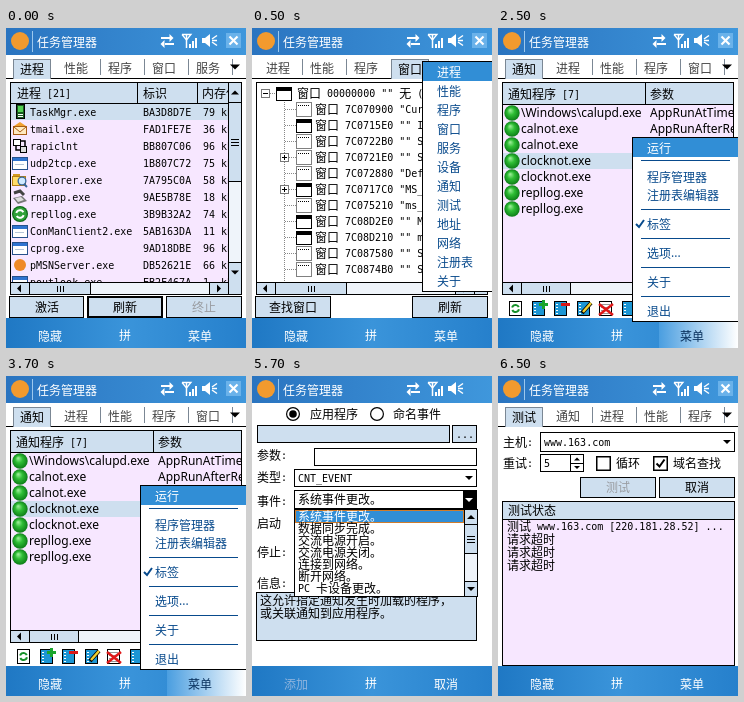
An HTML page with a canvas that plays this animation: 240x320 px, repeating every 8 s.

```html
<!DOCTYPE html>
<html lang="zh-CN">
<head>
<meta charset="utf-8">
<title>任务管理器</title>
<style>
html, body { margin: 0; width: 100%; height: 100%; overflow: hidden; background: #fff; }
canvas { display: block; width: 240px; height: 320px; }
</style>
</head>
<body>
<canvas id="stage" width="240" height="320"></canvas>
<script>
const ctx = document.getElementById('stage').getContext('2d');
const CJK = '"Noto Sans CJK SC", "Noto Sans CJK", sans-serif';
const MONO = '10px "DejaVu Sans Mono", monospace';
const SANS = '12px "Noto Sans", "Open Sans", sans-serif';
const FACE = '#cedfef', LILAC = '#f7e7ff', BLUE = '#318ed6', GRAY = '#9a9da2', NAVY = '#084a8c';

// ---------- primitives ----------
function fill(x, y, w, h, color) {
  ctx.fillStyle = color;
  ctx.fillRect(x, y, w, h);
}

function box(x, y, w, h, color, edge = '#000') {
  fill(x, y, w, h, edge);
  fill(x + 1, y + 1, w - 2, h - 2, color);
}

function line(points, color = '#000', width = 1) {
  ctx.strokeStyle = color;
  ctx.lineWidth = width;
  ctx.beginPath();
  points.forEach(([x, y], i) => i ? ctx.lineTo(x, y) : ctx.moveTo(x, y));
  ctx.stroke();
}

function poly(points, color = '#000') {
  ctx.fillStyle = color;
  ctx.beginPath();
  points.forEach(([x, y]) => ctx.lineTo(x, y));
  ctx.fill();
}

function disc(x, y, r, color) {
  ctx.fillStyle = color;
  ctx.beginPath();
  ctx.arc(x, y, r, 0, Math.PI * 2);
  ctx.fill();
}

function arc(x, y, r, from, to, color, width = 1) {
  ctx.strokeStyle = color;
  ctx.lineWidth = width;
  ctx.beginPath();
  ctx.arc(x, y, r, from, to);
  ctx.stroke();
}

function clip(x, y, w, h, draw) {
  ctx.save();
  ctx.beginPath();
  ctx.rect(x, y, w, h);
  ctx.clip();
  draw();
  ctx.restore();
}

// Wide glyphs fill a 12px cell, Latin ones a 6px cell; cy is the row centre.
function text(str, x, cy, color = '#000', latin = MONO) {
  ctx.fillStyle = color;
  for (const run of str.match(/[\u3000-\u9fff\uff00-\uffef]+|[^\u3000-\u9fff\uff00-\uffef]+/g)) {
    const wide = run.charCodeAt(0) >= 0x3000;
    ctx.font = wide ? '12px ' + CJK : latin;
    ctx.fillText(run, x, cy + (wide ? 5 : 4));
    x += ctx.measureText(run).width;
  }
}

function arrow(x, y, dir, s = 4, color = '#000') {
  ctx.save();
  ctx.translate(x, y);
  ctx.rotate({ down: 0, left: 1, up: 2, right: 3 }[dir] * Math.PI / 2);
  poly([[-s, -s / 2], [s, -s / 2], [0, s / 2]], color);
  ctx.restore();
}

function check(x, y, color = '#000') {
  line([[x - 4, y], [x - 1, y + 3], [x + 4, y - 4]], color, 2);
}

// ---------- widgets ----------
function vScroll(x, y, h, thumb, btn = 21) {
  box(x, y, 14, h, '#eff4fa');
  box(x, y, 14, btn, FACE);
  box(x, y + btn - 1, 14, thumb, FACE);
  box(x, y + h - btn, 14, btn, FACE);
  arrow(x + 7, y + btn / 2, 'up');
  arrow(x + 7, y + h - btn / 2, 'down');
  const mid = Math.round(y + btn - 1 + thumb / 2);
  for (let i = -1; i < 2; i++) fill(x + 3, mid + i * 3, 8, 1, '#000');
}

function hScroll(x, y, w, thumb, btn = 20) {
  box(x, y, w, 13, '#eff4fa');
  box(x, y, btn, 13, FACE);
  box(x + btn - 1, y, thumb, 13, FACE);
  box(x + w - btn, y, btn, 13, FACE);
  arrow(x + btn / 2 - 1, y + 6.5, 'left');
  arrow(x + w - btn / 2, y + 6.5, 'right');
  const mid = Math.round(x + btn - 1 + thumb / 2);
  for (let i = -1; i < 2; i++) fill(mid + i * 3, y + 4, 1, 6, '#000');
}

function button(label, x, y, w, h, off, strong) {
  box(x, y, w, h, FACE);
  if (strong) box(x + 1, y + 1, w - 2, h - 2, FACE);
  text(label, Math.round(x + (w - label.length * 12) / 2), y + Math.floor(h / 2), off ? GRAY : '#000');
}

function combo(value, x, y, w, h) {
  box(x, y, w, h, '#fff');
  text(value, x + 4, y + Math.floor(h / 2));
  arrow(x + w - 8, y + h / 2, 'down');
}

function radio(x, y, on) {
  disc(x, y, 7, '#000');
  disc(x, y, 5.8, '#fff');
  if (on) disc(x, y, 3.8, '#000');
}

function checkbox(x, y, on) {
  box(x, y, 15, 15, '#000');
  fill(x + 1.5, y + 1.5, 12, 12, '#fff');
  if (on) check(x + 7.5, y + 7.5);
}

function tabs(names, active) {
  fill(0, 50, 240, 1, '#000');
  names.forEach((name, i) => {
    const x = 7 + i * 44, on = i === active;
    if (on) {
      fill(x, 31, 38, 20, '#7b8794');
      fill(x + 1, 32, 36, 19, FACE);
    } else if (i + 1 !== active) {
      fill(x + 43, 31, 1, 16, '#7b8794');
    }
    text(name, x + 7, on ? 41 : 40, on ? '#000' : '#444');
  });
  arrow(229, 39, 'down', 5);
}

// ---------- chrome ----------
function bar(x, y, w, h, ...stops) {
  const g = ctx.createLinearGradient(x, 0, x + w, 0);
  stops.forEach((color, i) => g.addColorStop(i / (stops.length - 1), color));
  fill(x, y, w, h, g);
}

function statusIcons(close) {
  line([[155, 10], [164, 10]], '#fff', 2);
  line([[159, 16], [168, 16]], '#fff', 2);
  arrow(165.5, 10, 'right', 4, '#fff');
  arrow(156.5, 16, 'left', 4, '#fff');

  line([[176, 6.5], [185, 6.5], [180.5, 12], [176, 6.5]], '#fff', 1.3);
  line([[180.5, 7], [180.5, 20]], '#fff', 1.5);
  for (let i = 0; i < 3; i++) fill(183 + i * 3, 16 - i * 3, 2, 4 + i * 3, '#fff');

  poly([[196, 10], [199, 10], [204, 6], [204, 19], [199, 15], [196, 15]], '#fff');
  for (const d of [-5, 0, 5]) line([[206, 12.5 + d * 0.3], [211, 12.5 + d]], '#fff', 1.5);

  if (close) {
    fill(220, 5, 15, 15, '#6ab2ea');
    line([[223.5, 8.5], [231.5, 16.5]], '#fff', 2.2);
    line([[231.5, 8.5], [223.5, 16.5]], '#fff', 2.2);
  }
}

function chrome(left, right, { close = true, leftOff, pressed } = {}) {
  fill(0, 0, 240, 320, '#fff');
  bar(0, 0, 240, 27, '#2a74c0', '#3f97dc');
  disc(14, 13, 9, '#f29a2e');
  fill(26, 3, 1, 21, '#9cc8ee');
  text('任务管理器', 31, 14, '#fff', SANS);
  statusIcons(close);

  bar(0, 290, 240, 30, '#1f78c4', '#3a94da', '#2680cc');
  if (pressed) bar(161, 290, 79, 30, '#4a9ee0', '#a5cff0', '#fff');
  text(left, 32, 308, leftOff ? '#8fb4dd' : '#fff');
  text('拼', 113, 307, '#fff');
  text(right, 182, 308, pressed ? '#08305c' : '#fff');
}

// ---------- small icons ----------
const icons = {
  phone(x, y) {
    box(x + 4, y, 9, 15, '#185c20');
    fill(x + 6, y + 2, 5, 6, '#52d050');
    for (let i = 0; i < 2; i++) fill(x + 6, y + 10 + i * 2, 5, 1, '#fff');
  },
  mail(x, y) {
    box(x + 1, y + 5, 14, 9, '#ffe9c0', '#a85c14');
    line([[x + 2, y + 6], [x + 8, y + 11], [x + 14, y + 6]], '#a85c14');
    poly([[x + 2, y + 5], [x + 8, y + 1], [x + 14, y + 5]], '#f0a030');
  },
  link(x, y) {
    box(x + 1, y + 1, 8, 7, '#fff');
    box(x + 8, y + 8, 7, 7, '#ddd');
    line([[x + 4, y + 8], [x + 4, y + 12], [x + 8, y + 12]], '#000', 1.5);
    line([[x + 9, y + 3], [x + 13, y + 3], [x + 13, y + 8]], '#000', 1.5);
  },
  window(x, y) {
    box(x, y + 2, 16, 13, '#fff', '#28518c');
    fill(x + 1, y + 3, 14, 3, '#2f73d0');
    fill(x + 3, y + 9, 9, 1, '#b4c4d8');
  },
  folder(x, y) {
    fill(x + 1, y + 2, 7, 3, '#d29a20');
    box(x, y + 4, 14, 10, '#ffdc68', '#b47e14');
    disc(x + 10, y + 9, 4.5, '#35659a');
    disc(x + 10, y + 9, 3.2, '#cfeaff');
    line([[x + 12, y + 12], [x + 15, y + 15]], '#35659a', 2);
  },
  modem(x, y) {
    line([[x + 2, y + 4], [x + 8, y + 2], [x + 12, y + 6]], '#444', 3);
    poly([[x + 1, y + 9], [x + 10, y + 7], [x + 15, y + 12], [x + 6, y + 15]], '#777');
    poly([[x + 3, y + 9], [x + 9, y + 8], [x + 12, y + 11], [x + 6, y + 13]], '#ddd');
  },
  sync(x, y) {
    disc(x + 8, y + 8, 8, '#0c6a18');
    disc(x + 8, y + 8, 6.8, '#2fa038');
    arc(x + 8, y + 8, 3.8, 0.3, 2.6, '#fff', 2);
    arc(x + 8, y + 8, 3.8, 3.4, 5.8, '#fff', 2);
  },
  plain(x, y) {
    disc(x + 8, y + 8, 6, '#ef8a28');
  }
};

function treeIcon(x, y, solid) {
  if (solid) {
    box(x, y - 6, 16, 14, '#fff');
    fill(x, y - 6, 16, 4, '#000');
    return;
  }
  ctx.setLineDash([1, 1]);
  ctx.strokeStyle = '#000';
  ctx.lineWidth = 1;
  ctx.strokeRect(x + 0.5, y - 6.5, 15, 14);
  line([[x + 2, y - 3.5], [x + 14, y - 3.5]], '#000');
  ctx.setLineDash([]);
}

function toggle(x, y, plus) {
  box(x - 4, y - 4, 9, 9, '#fff', '#777');
  fill(x - 2, y, 5, 1, '#000');
  if (plus) fill(x, y - 2, 1, 5, '#000');
}

// ---------- scenes ----------
const PROCS = [
  ['phone', 'TaskMgr.exe', 'BA3D8D7E', '79'], ['mail', 'tmail.exe', 'FAD1FE7E', '36'],
  ['link', 'rapiclnt', 'BB807C06', '96'], ['window', 'udp2tcp.exe', '1B807C72', '75'],
  ['folder', 'Explorer.exe', '7A795C0A', '58'], ['modem', 'rnaapp.exe', '9AE5B78E', '18'],
  ['sync', 'repllog.exe', '3B9B32A2', '74'], ['window', 'ConManClient2.exe', '5AB163DA', '11'],
  ['window', 'cprog.exe', '9AD18DBE', '96'], ['plain', 'pMSNServer.exe', 'DB52621E', '66'],
  ['window', 'poutlook.exe', 'EB2F467A', '1 ']
];

function processes() {
  chrome('隐藏', '菜单');
  tabs(['进程', '性能', '程序', '窗口', '服务'], 0);
  box(4, 54, 232, 213, LILAC);
  clip(5, 55, 217, 199, () => {
    fill(5, 55, 217, 20, FACE);
    fill(5, 75, 217, 1, '#000');
    for (const x of [131, 191]) fill(x, 55, 1, 20, '#000');
    text('进程 [21]', 11, 65);
    text('标识', 137, 65);
    text('内存使用', 196, 65);
    fill(5, 76, 217, 16, FACE);
    PROCS.forEach(([icon, name, id, mem], i) => {
      const y = 84 + i * 17;
      icons[icon](6, y - 8);
      text(name, 24, y);
      text(id, 137, y);
      text(mem + ' kb', 197, y);
    });
  });
  vScroll(222, 54, 201, 80);
  fill(222, 254, 13, 12, FACE);
  hScroll(4, 254, 219, 62);
  button('激活', 3, 268, 75, 22);
  button('刷新', 81, 268, 76, 22, false, true);
  button('终止', 160, 268, 76, 22, true);
}

const WINDOWS = [
  ['7C070900', '"Cursor"'], ['7C0715E0', '"" IME', 1], ['7C0722B0', '"" SIP'], ['7C0721E0', '"" SIP', 0, 1],
  ['7C072880', '"Default'], ['7C0717C0', '"MS_SIP', 1, 1], ['7C075210', '"ms_sip'], ['7C08D2E0', '"" MNU', 1],
  ['7C08D210', '"" mnu', 1], ['7C087580', '"" SHL'], ['7C0874B0', '"" SHL']
];

function windowTree() {
  chrome('隐藏', '菜单');
  tabs(['进程', '性能', '程序', '窗口'], 3);
  box(4, 54, 232, 213, '#fff');
  clip(5, 55, 217, 199, () => {
    ctx.setLineDash([1, 1]);
    line([[32.5, 74], [32.5, 254]], '#888');
    line([[18, 65.5], [24, 65.5]], '#888');
    WINDOWS.forEach((_, i) => line([[33, 81.5 + i * 16], [44, 81.5 + i * 16]], '#888'));
    ctx.setLineDash([]);
    toggle(13, 65, false);
    treeIcon(24, 65, true);
    text('窗口 00000000 "" 无 (', 45, 65);
    WINDOWS.forEach(([id, title, solid, plus], i) => {
      const y = 81 + i * 16;
      if (plus) toggle(32, y, true);
      treeIcon(44, y, solid);
      text('窗口 ' + id + ' ' + title, 63, y);
    });
  });
  vScroll(222, 54, 201, 60);
  fill(222, 254, 13, 12, FACE);
  hScroll(4, 254, 219, 72);
  button('查找窗口', 3, 268, 76, 22);
  button('刷新', 160, 268, 76, 22);

  box(170, 33, 71, 231, '#fff');
  fill(171, 34, 69, 19, BLUE);
  ['进程', '性能', '程序', '窗口', '服务', '设备', '通知', '测试', '地址', '网络', '注册表', '关于']
    .forEach((name, i) => text(name, 185, 44 + i * 19, i ? NAVY : '#fff'));
}

function page(x, y, color) {
  box(x, y, 13, 15, color);
  for (let k = 0; k < 4; k++) fill(x + 2, y + 3 + k * 3, color === '#fff' ? 9 : 2, 1, color === '#fff' ? '#999' : '#fff');
}

const CYAN = '#1c96d4';
const tools = [
  (x, y) => {
    box(x, y, 13, 15, '#fff');
    arc(x + 6.5, y + 7.5, 3.5, 0.2, 2.7, '#159028', 2);
    arc(x + 6.5, y + 7.5, 3.5, 3.4, 5.9, '#159028', 2);
  },
  (x, y) => {
    page(x, y, CYAN);
    fill(x + 10, y - 1, 3, 9, '#1aa52c');
    fill(x + 7, y + 2, 9, 3, '#1aa52c');
  },
  (x, y) => {
    page(x, y, CYAN);
    fill(x + 7, y + 2, 9, 3, '#d81818');
  },
  (x, y) => {
    page(x, y, CYAN);
    line([[x + 5, y + 12], [x + 14, y + 2]], '#000', 4);
    line([[x + 6, y + 11], [x + 14, y + 2]], '#f0d030', 2.5);
  },
  (x, y) => {
    page(x, y, '#fff');
    line([[x, y + 3], [x + 14, y + 14]], '#e01818', 2.5);
    line([[x + 14, y + 3], [x, y + 14]], '#e01818', 2.5);
  },
  (x, y) => page(x, y, CYAN)
];

function ball(x, y) {
  const g = ctx.createRadialGradient(x - 2, y - 3, 0, x, y, 8);
  g.addColorStop(0, '#a5f0a0');
  g.addColorStop(0.45, '#2fbe35');
  g.addColorStop(1, '#0b7a16');
  disc(x, y, 7.7, g);
}

function notifications() {
  chrome('隐藏', '菜单', { pressed: true });
  tabs(['通知', '进程', '性能', '程序', '窗口'], 0);
  box(4, 54, 232, 213, LILAC);
  clip(5, 55, 230, 199, () => {
    fill(5, 55, 230, 21, FACE);
    fill(5, 76, 230, 1, '#000');
    fill(147, 55, 1, 21, '#000');
    text('通知程序 [7]', 10, 66);
    text('参数', 152, 66);
    fill(5, 125, 230, 16, FACE);
    ['\\Windows\\calupd.exe', 'calnot.exe', 'calnot.exe', 'clocknot.exe', 'clocknot.exe', 'repllog.exe', 'repllog.exe']
      .forEach((name, i) => {
        const y = 85 + i * 16;
        ball(14, y);
        text(name, 23, y, '#000', SANS);
      });
    text('AppRunAtTime', 152, 85, '#000', SANS);
    text('AppRunAfterRe', 152, 101, '#000', SANS);
  });
  hScroll(4, 254, 232, 50);
  tools.forEach((draw, i) => draw(Math.round(11 + i * 22.5), 273));

  box(134, 109, 107, 185, '#fff');
  fill(135, 110, 105, 19, BLUE);
  for (const y of [132, 181, 210, 239, 268]) fill(143, y, 89, 1, NAVY);
  text('运行', 149, 120, '#fff');
  [['程序管理器', 149], ['注册表编辑器', 167], ['标签', 196], ['选项...', 225], ['关于', 254], ['退出', 283]]
    .forEach(([name, y]) => text(name, 149, y, NAVY, SANS));
  check(142, 196, NAVY);
}

function eventForm() {
  chrome('添加', '取消', { close: false, leftOff: true });
  radio(41, 38, true);
  text('应用程序', 58, 38);
  radio(125, 38, false);
  text('命名事件', 141, 38);
  box(5, 49, 193, 18, FACE);
  box(200, 49, 25, 18, FACE);
  text('...', 204, 58);
  [['参数:', 79], ['类型:', 101], ['事件:', 125], ['启动', 147], ['停止:', 176], ['信息:', 207]]
    .forEach(([name, y]) => text(name, 5, y));
  box(62, 72, 163, 18, '#fff');
  combo('CNT_EVENT', 42, 93, 183, 18);
  combo('系统事件更改。', 42, 114, 183, 19);
  box(211, 115, 13, 17, '#000');
  arrow(217, 124, 'down', 4, '#fff');
  box(62, 190, 164, 21, '#fff');
  box(4, 216, 221, 49, FACE);
  text('这允许指定通知发生时加载的程序，', 8, 224);
  text('或关联通知到应用程序。', 8, 237);

  box(42, 133, 184, 88, '#fff');
  fill(43, 134, 169, 13, BLUE);
  ctx.strokeStyle = '#d07c2c';
  ctx.lineWidth = 1;
  ctx.strokeRect(43.5, 134.5, 168, 12);
  ['系统事件更改。', '数据同步完成。', '交流电源开启。', '交流电源关闭。', '连接到网络。', '断开网络。', 'PC 卡设备更改。']
    .forEach((name, i) => text(name, 46, 140 + i * 12, i ? '#000' : '#fff'));
  vScroll(212, 133, 88, 30, 16);
}

function pingTest() {
  chrome('隐藏', '菜单');
  tabs(['测试', '通知', '进程', '性能', '程序'], 0);
  text('主机:', 5, 66);
  combo('www.163.com', 42, 56, 195, 20);
  text('重试:', 5, 87);
  box(42, 78, 44, 18, '#fff');
  text('5', 46, 87);
  fill(72, 79, 1, 16, '#000');
  fill(73, 87, 12, 1, '#000');
  arrow(79, 83, 'up', 3);
  arrow(79, 91.5, 'down', 3);
  checkbox(98, 80, false);
  text('循环', 118, 87);
  checkbox(155, 80, true);
  text('域名查找', 175, 87);
  button('测试', 82, 101, 76, 21, true);
  button('取消', 161, 101, 76, 21);
  box(4, 125, 233, 165, LILAC);
  fill(5, 126, 231, 17, FACE);
  fill(5, 143, 231, 1, '#000');
  text('测试状态', 10, 134);
  ['测试 www.163.com [220.181.28.52] ...', '请求超时', '请求超时', '请求超时']
    .forEach((row, i) => text(row, 9, 150 + i * 13));
}

// ---------- playback ----------
const LOOP = 8000;
const scenes = [[500, processes], [2500, windowTree], [4500, notifications], [6500, eventForm], [LOOP, pingTest]];

function tick() {
  const t = performance.now() % LOOP;
  scenes.find(([end]) => t < end)[1]();
  requestAnimationFrame(tick);
}
tick();
</script>
</body>
</html>
```
